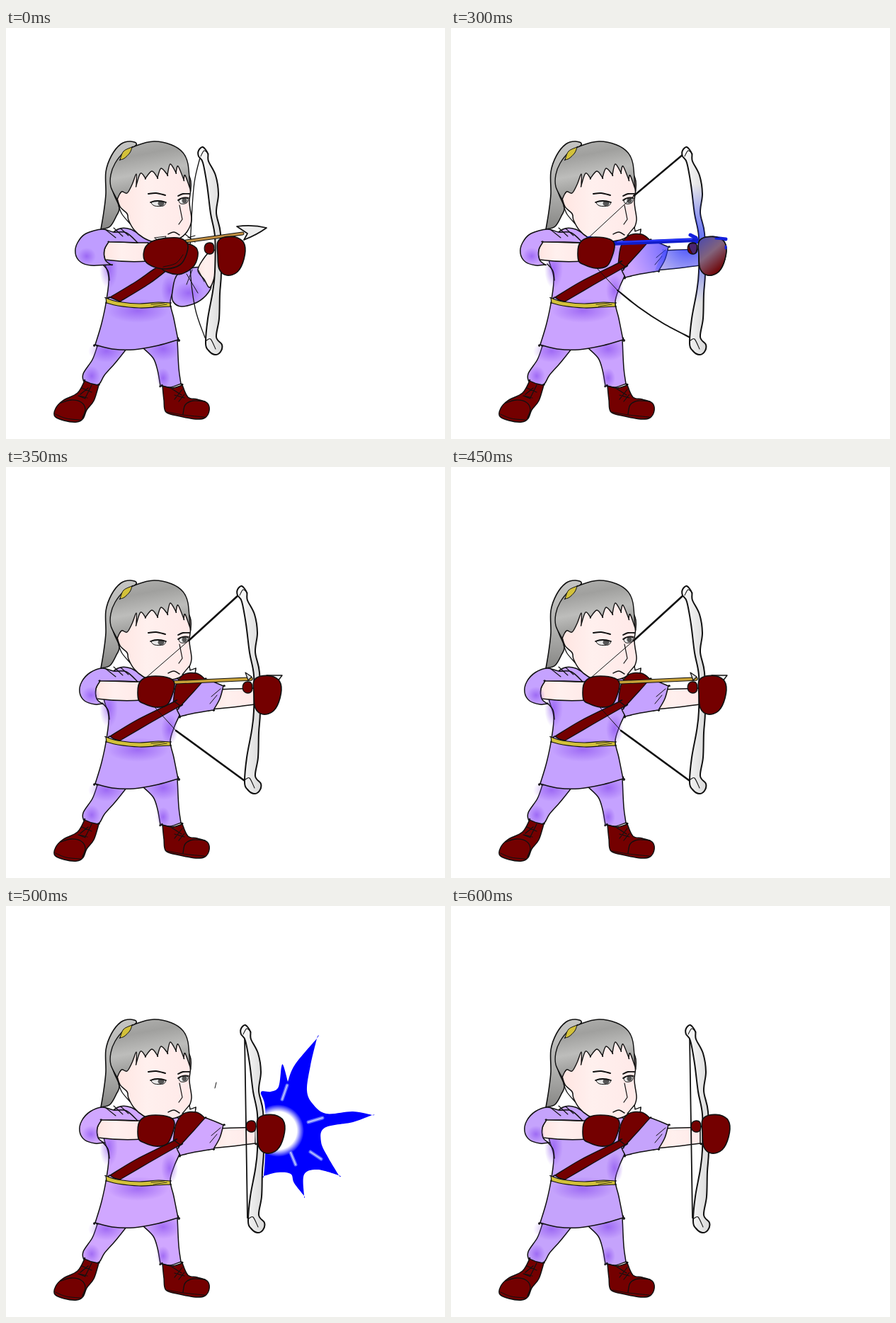
Recreate the animation shown at these times as an HTML page. Size 620 by 580 pixels, loop 650 ms.

```html
<!DOCTYPE html>
<html lang="en">
<head>
<meta charset="utf-8">
<title>Archer</title>
<style>
html, body { margin: 0; width: 100%; height: 100%; overflow: hidden; background: #fff; }
svg { display: block; width: 620px; height: 580px; stroke-linecap: round; stroke-linejoin: round; }
</style>
</head>
<body>
<svg viewBox="0 0 620 580">
  <defs>
    <linearGradient id="hair" x1="0" y1="0" x2=".25" y2="1">
      <stop offset="0" stop-color="#b2b2b0"/><stop offset=".3" stop-color="#a0a09e"/>
      <stop offset=".6" stop-color="#bdbdbb"/><stop offset="1" stop-color="#8f8f8d"/>
    </linearGradient>
    <linearGradient id="tail" x1="0" y1="0" x2="0" y2="1">
      <stop offset="0" stop-color="#c4c4c2"/><stop offset=".55" stop-color="#b2b2b0"/><stop offset="1" stop-color="#858583"/>
    </linearGradient>
    <linearGradient id="skin" x1="0" y1="0" x2="1" y2="0">
      <stop offset="0" stop-color="#ffe5e1"/><stop offset=".4" stop-color="#fff0ee"/><stop offset="1" stop-color="#ffe9e8"/>
    </linearGradient>
    <linearGradient id="wood" x1="0" y1="0" x2="1" y2="0">
      <stop offset="0" stop-color="#fff"/><stop offset="1" stop-color="#d8d8d8"/>
    </linearGradient>
    <radialGradient id="shade">
      <stop offset="0" stop-color="#8446ee" stop-opacity=".6"/><stop offset="1" stop-color="#8446ee" stop-opacity="0"/>
    </radialGradient>
    <radialGradient id="glow" gradientUnits="userSpaceOnUse" cx="334" cy="304" r="85">
      <stop offset="0" stop-color="#2030ff" stop-opacity=".85"/><stop offset="1" stop-color="#4050ff" stop-opacity="0"/>
    </radialGradient>
    <linearGradient id="handGlow" x1="0" y1="0" x2=".6" y2="1">
      <stop offset="0" stop-color="#4848b0"/><stop offset=".5" stop-color="#82637c"/><stop offset="1" stop-color="#6e0000"/>
    </linearGradient>
    <radialGradient id="core">
      <stop offset=".72" stop-color="#fff"/><stop offset="1" stop-color="#fff" stop-opacity="0"/>
    </radialGradient>
  </defs>
  <g id="stage"></g>
</svg>
<script>
const RED = '#740000', SKIN = 'url(#skin)', GOLD = '#d3c13a', INK = '#111';

// Smooth curve through points; a repeated point makes a corner.
function spline(text, closed) {
  const p = text.trim().split(/\s+/).map(s => s.split(',').map(Number));
  const n = p.length, at = i => closed ? p[(i + n) % n] : p[Math.max(0, Math.min(n - 1, i))];
  let d = 'M' + p[0];
  for (let i = 0; i < n - (closed ? 0 : 1); i++) {
    const [a, b, c, e] = [at(i - 1), at(i), at(i + 1), at(i + 2)];
    d += `C${b[0] + (c[0] - a[0]) / 6},${b[1] + (c[1] - a[1]) / 6} ` +
         `${c[0] - (e[0] - b[0]) / 6},${c[1] - (e[1] - b[1]) / 6} ${c}`;
  }
  return d + (closed ? 'Z' : '');
}
const path = (d, fill, w = 1.5, ink = INK) =>
  `<path d="${d}" fill="${fill}" stroke="${w ? ink : 'none'}" stroke-width="${w}"/>`;
const blob = (pts, fill, w) => path(spline(pts, true), fill, w);
const curve = (pts, w = 1.4, ink = INK) => path(spline(pts), 'none', w, ink);
const line = (d, w = 1.2, ink = INK) => path(d, 'none', w, ink);
const move = (x, s) => `<g transform="translate(${x} 0)">${s}</g>`;
const shade = (x, y, rx, ry) => `<ellipse cx="${x}" cy="${y}" rx="${rx}" ry="${ry}" fill="url(#shade)"/>`;

const boots =
  blob('111,498 111,498 101,515 80,526 70,537 69,548 82,554 100,556 109,551 114,539 124,526 131,504 131,504 121,502', RED) +
  curve('77,529 92,525 106,528 112,538 108,550', 1.3) +
  curve('70,545 85,551 105,553', 1) +
  line('M107 508l14 6M105 517l11-9M103 519l12 3M121 504l-9 18M112 523l-10-4') +
  blob('221,505 221,505 223,525 226,542 246,548 268,552 281,550 287,540 284,529 270,524 257,521 249,504 249,504 235,508', RED) +
  curve('250,545 253,532 264,526 281,527', 1.3) +
  curve('228,542 250,546 280,549', 1) +
  line('M234 509l14 9M249 510l-11 14M238 518l14 4M252 517l-8 10');

const legs = c =>
  blob('129,449 129,449 122,468 109,488 111,500 122,504 132,502 139,490 154,473 170,453 170,453 148,445', c) +
  shade(142, 456, 26, 16) + shade(121, 491, 12, 14) +
  blob('194,452 194,452 208,466 214,483 218,505 218,505 232,507 247,502 247,502 244,480 242,440 242,440 220,442', c) +
  shade(222, 453, 25, 17) + shade(222, 494, 10, 14) + boots;

const torso = c =>
  blob('158,284 143,300 138,325 145,352 142,383 135,417 126,447 126,447 150,453 180,454 215,448 243,440 243,440 237,410 232,387 238,366 249,340 252,312 238,297 205,300 176,284', c) +
  shade(186, 399, 44, 17) + shade(145, 340, 13, 28) + shade(205, 313, 38, 16) + shade(231, 370, 12, 22) +
  curve('136,333 144,343 146,356') + line('M184 309l-17-16', 1);

const belt = path(spline('141,381 141,381 157,386 188,389 215,387 232,388 232,388 232,393 232,393 212,394 188,395 158,392 142,388 142,388', true), GOLD, 1.2) +
  line('M205 390l19-2M208 393l19-3', .8);

const ponytail =
  blob('184,165 176,160 162,164 149,180 141,203 141,234 138,260 134,284 134,284 147,280 156,265 160,253 151,230 150,205 165,180', 'url(#tail)', 1.6) +
  curve('159,251 164,263 175,276', 1.3);

const head =
  blob('173,205 163,231 157,237 161,252 171,262 173,271 181,285 194,296 210,302 229,301 245,297 256,287 262,271 259,246 260,212 235,185', SKIN, 1.5) +
  blob('157,242 157,242 148,224 148,207 154,191 166,176 184,166 209,160 234,165 250,176 257,192 260,227 260,227 253,208 251,214 251,214 243,195 240,204 240,204 232,192 228,207 228,207 219,198 214,211 214,211 206,202 197,212 197,212 190,205 184,222 184,222 184,206 178,221 171,233 163,231', 'url(#hair)', 1.4) +
  blob('161,186 161,186 166,174 178,168 178,168 175,176 167,184', GOLD, 1) +
  curve('201,234 212,233 225,236', 2) + curve('243,237 250,234 259,234', 1.8) +
  blob('205,246 213,244 225,246 222,251 210,251', '#e8e8e8', 1) +
  `<ellipse cx="219" cy="247.5" rx="4.5" ry="3.8" fill="#555"/>` + line('M204 246Q214 242 226 246', 1.8) +
  blob('244,243 250,240 257,241 255,247 247,248', '#e8e8e8', 1) +
  `<ellipse cx="252" cy="243.500" rx="3.500" ry="3.700" fill="#555"/>` + line('M243 243Q250 238 258 240', 1.7) +
  line('M245 250L249 270 244 277', 1.2) + curve('229,291 237,288 245,292', 1.4);

const bowShape = spline('327,173 333,168 340,177 341,188 351,208 355,234 352,261 358,290 359,345 357,375 356,410 352,436 360,447 358,457 350,461 341,455 337,445 340,410 347,372 350,344 350,294 344,262 339,222 333,190 327,181', true);
const bow = path(bowShape, 'url(#wood)', 2) + curve('330,181 335,173 341,178', 1.1) + curve('338,441 344,439 351,453', 1.1);

const handShape = spline('350,302 360,295 378,296 388,306 387,326 378,344 363,349 352,340 350,320', true);
const hand = path(handShape, RED, 1.7) + blob('335,307 341,303 347,306 347,316 341,319 335,315', RED, 1.4);

const feathers = path('M249 293L259 281 260 287 268 284 267 293Z', '#f4f4f4', 1.3);
const strap = blob('147,380 147,380 185,357 238,331 238,331 246,337 246,337 202,362 161,386 161,386 153,384', RED, 1.4);
const shoulder = blob('236,334 236,334 240,308 251,293 269,291 281,299 281,299 266,316 244,340 244,340', RED, 1.4);

const backSleeve = spline('265,301 281,299 307,309 307,309 302,327 293,343 293,343 268,347 246,352 246,352 240,330', true);
const backArm = spline('300,314 300,314 326,313 352,312 352,312 352,335 352,335 320,339 288,342 288,342', true);
const reach = c => path(backArm, SKIN, 1.5) + path(backSleeve, c, 1.5) + line('M303 313l-13 11M298 322l-10 12', 1);

// Near arm: x = outer sleeve edge, cuff = sleeve opening, end = wrist
const nearArm = (c, x, cuff, end) =>
  path(`M${cuff + 4} 301Q${cuff + 30} 303 ${end + 6} 303V329Q${cuff + 30} 331 ${cuff - 1} 327Q${cuff - 6} 313 ${cuff + 4} 301Z`, SKIN, 1.5) +
  path(spline(`186,303 170,289 152,288 136,284 ${x + 15},290 ${x + 3},303 ${x},318 ${x + 7},330 ${x + 22},335 ${cuff + 7},334 ${cuff + 7},334 ${cuff - 1},327 ${cuff - 2},313 ${cuff + 4},302 ${cuff + 4},302 160,302 186,303`), c, 1.5) +
  shade(x + 16, 322, 13, 12) + line('M140 284l15 12M152 282l13 12M162 283l11 10', 1.1);

const fist = x => move(x, blob('187,308 195,298 211,295 231,298 238,306 234,324 227,336 211,339 195,334 187,328', RED, 1.6));

function burst(x, size) {
  const streaks = 'M390 273l7-20M427 305l20-6M430 347l15 10M402 348l7 17';
  return `<g transform="translate(${365 + x} 317) scale(${size}) translate(-365 -317)">` +
    path(spline('360,263 374,262 385,255 389,227 392,226 398,248 398,248 408,224 439,187 439,187 430,225 425,260 433,279 452,293 490,290 517,295 517,295 490,305 450,313 445,333 455,355 470,380 470,380 440,372 421,379 421,409 421,409 407,391 402,378 384,376 364,381 364,381 366,350 366,285', true), '#0000ff', 0) +
    `<circle cx="384" cy="317" r="37" fill="url(#core)"/>` + line(streaks, 5, '#5966ff') + line(streaks, 2, '#b5bcff') + '</g>';
}

const base = c => ponytail + legs(c) + torso(c);

function aim() {
  const c = '#bf9dff';
  return base(c) +
    blob('243,347 235,372 236,386 248,393 270,387 286,373 289,360 275,338', c) + shade(258, 374, 22, 16) +
    blob('271,342 278,327 290,314 298,318 296,345 288,366 280,355', SKIN) + line('M272 342l8 16M263 341l-8 21M255 347l16 27', 1) +
    head + path('M210 296L226 294 221 303Z', '#fff', 1) +
    blob('147,380 147,380 185,357 215,337 232,338 232,338 202,361 161,386 161,386', RED, 1.4) + belt +
    curve('274,183 266,218 262,270 260,335 267,395 281,437', 1.3) +
    move(-55, bow) + line('M253 291l14 11M257 296l10-3', 1.2) +
    line('M254 301L334 290', 5) + line('M254 301L334 290', 3, '#c18f42') +
    path('M326 280Q348 277 368 282Q354 292 336 299L341 290Z', '#ededed', 1.7) +
    move(-51, path(handShape, RED, 1.7)) + move(-54, blob('335,307 341,303 347,306 347,316 341,319 335,315', RED, 1.4)) +
    blob('240,304 262,306 271,316 266,335 248,347 229,345 220,335', RED) +
    nearArm(c, 98, 141, 195) +
    blob('195,326 197,309 212,299 242,296 256,304 255,319 246,334 226,340 206,336', RED, 1.6) + curve('222,337 240,332 250,320', 1);
}

function draw(charged) {
  const c = charged ? '#caa3ff' : '#c5a2ff';
  const glow = d => charged ? path(d, 'url(#glow)', 0) : '';
  const x = charged ? 98 : 104;
  const shaft = charged
    ? line('M228 304L347 299', 6, '#101dca') + line('M235 302L340 298', 2, '#2836ff') + line('M338 292l8 4M338 306l9-4M370 296l18 2', 5, '#1420dd')
    : line('M235 304L346 299', 5.5) + line('M235 304L346 299', 3.5, '#c9a238') + path('M338 290l9 6-5 5z', '#ddd', 1.2) + path('M368 294L390 294 384 302Z', '#eee', 1.4);
  return base(c) + feathers + reach(c) + glow(backArm) + glow(backSleeve) + head + feathers + shoulder + strap + belt +
    (charged
      ? line('M327 179L258 237', 2.4) + line('M258 237L192 298', 1) + line('M207 340L235 370', 1) + curve('235,370 265,394 300,417 340,438', 2)
      : line('M327 182L258 245', 2.6) + line('M258 245L190 304', 1) + line('M202 330L240 372', 1) + line('M240 372L340 445', 2.6)) +
    nearArm(c, x, charged ? 126 : 129, charged ? 181 : 187) +
    bow + glow(bowShape) + shaft +
    (charged ? blob('187,302 194,294 204,297 199,304', '#2030c8', 0) : '') +
    fist(charged ? -7 : 0) + hand +
    (charged ? path(handShape, 'url(#handGlow)', 1.5) + blob('336,307 341,304 347,306 346,316 341,318', '#4b2470', 1) +
      line('M374 297l12 1M388 308v3', 3, '#1420dd') : '');
}

function release(flash) {
  const c = flash ? '#d0a7ff' : '#c5a3fc';
  return base(c) + feathers + reach(c) + head + feathers + shoulder + strap + belt +
    nearArm(c, 104, 131, 187) + fist(0) + flash +
    line('M337 183L339 310 341 440', 1.8) + move(5, bow + hand);
}

const rest = draw(false), charge = draw(true);
const tick = line('M297 249l-2 8', 1);
const steps = [
  [0, aim()], [150, rest], [300, charge], [350, rest], [400, charge], [450, rest],
  [500, release(burst(0, 1) + tick)], [550, release(burst(74, 1.1))], [600, release('')]
];

const stage = document.getElementById('stage');
let shown;
function frame(now) {
  const t = now % 650;
  const art = steps.filter(s => s[0] <= t).pop()[1];
  if (art !== shown) stage.innerHTML = shown = art;
  requestAnimationFrame(frame);
}
frame(performance.now());
</script>
</body>
</html>
```
